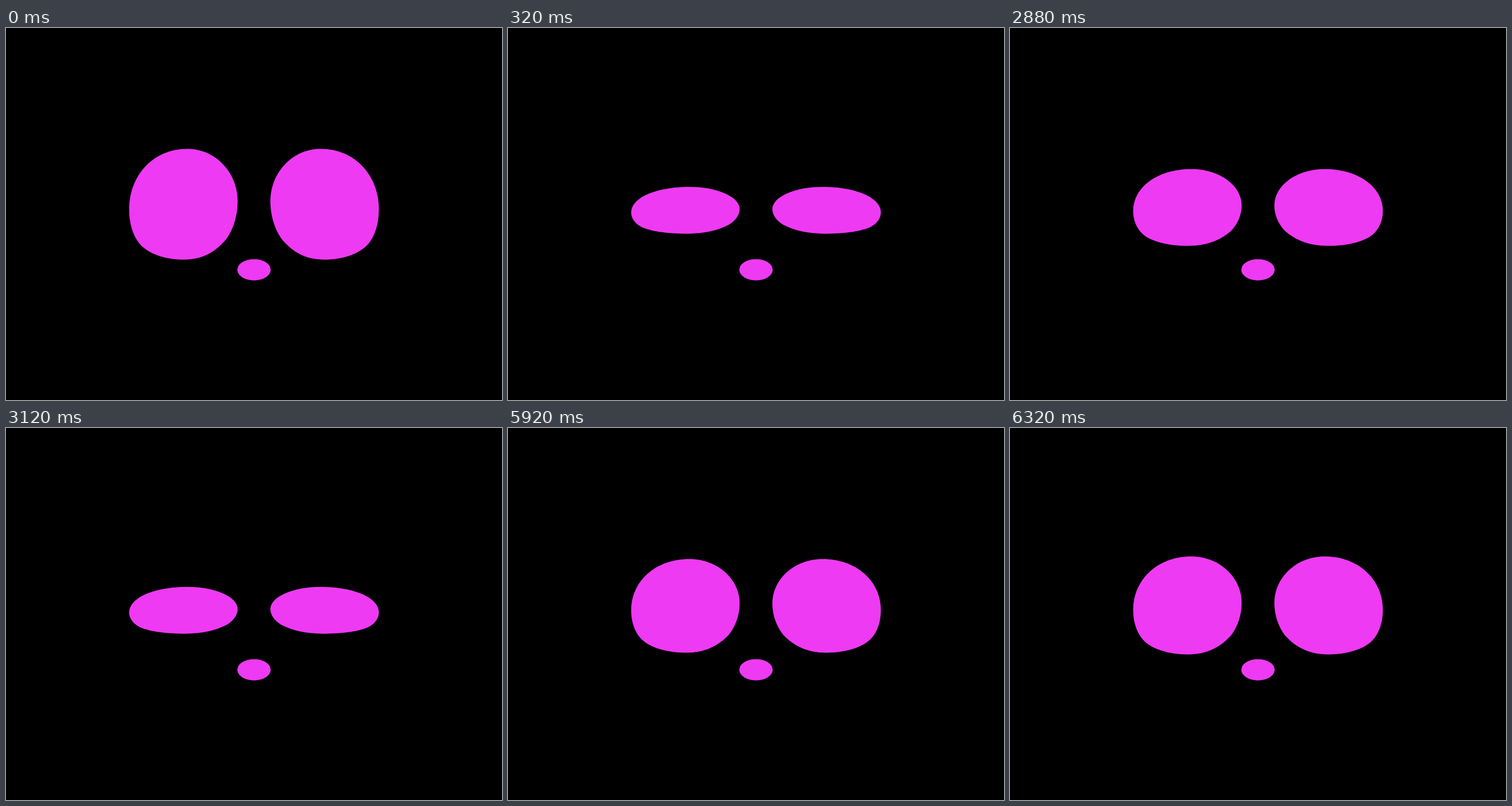
Animation of 864x648 px, one loop 6400 ms. Source, as an HTML page with a canvas:

```html
<!DOCTYPE html>
<html lang="en">
<head>
<meta charset="utf-8">
<title>Blink</title>
<style>
  html, body { margin: 0; width: 100%; height: 100%; overflow: hidden; background: #000; }
  canvas { display: block; }
</style>
</head>
<body>
<canvas id="stage" width="864" height="648"></canvas>
<script>
const ctx = document.getElementById('stage').getContext('2d');
const W = 864, H = 648;
const LOOP = 6400, STEP = 80;
const PINK = '#ee3af3';

const BLINKS = [0, 2800, 5880]; // start times in ms
const BLINK_MS = 470;
const CLOSE_MS = 260;           // time a full closing would take
const PIVOT_Y = 325.3;

const EYE = new Path2D(`M316 210.5
  C365 210.5 403.5 252 403.5 302
  C403.5 325 397 348 385 366
  C366 390 342 403.5 310 403.5
  C276 403.5 247 393 232 375
  C220 360 214.5 338 214.5 316
  C214.5 256 257 210.5 316 210.5Z`);

// Lids close and open again at a constant speed.
function openness(t) {
  const start = BLINKS.find(b => t >= b && t < b + BLINK_MS);
  if (start === undefined) return 1;
  const age = t - start;
  return 1 - Math.min(age, BLINK_MS - age) / CLOSE_MS;
}

function drawEye(open, mirrored) {
  ctx.save();
  if (mirrored) {
    ctx.translate(W, 0);
    ctx.scale(-1, 1);
  }
  ctx.translate(0, PIVOT_Y);
  ctx.scale(1, open);
  ctx.translate(0, -PIVOT_Y);
  ctx.fill(EYE);
  ctx.restore();
}

function draw(t) {
  const open = openness(t);
  ctx.fillStyle = '#000';
  ctx.fillRect(0, 0, W, H);
  ctx.fillStyle = PINK;
  drawEye(open, false);
  drawEye(open, true);
  ctx.beginPath();
  ctx.ellipse(W / 2, 421.2, 29, 18.5, 0, 0, Math.PI * 2);
  ctx.fill();
}

const begin = performance.now();
function tick() {
  const t = (performance.now() - begin) % LOOP;
  draw(Math.floor(t / STEP) * STEP);
  requestAnimationFrame(tick);
}
tick();
</script>
</body>
</html>
```
